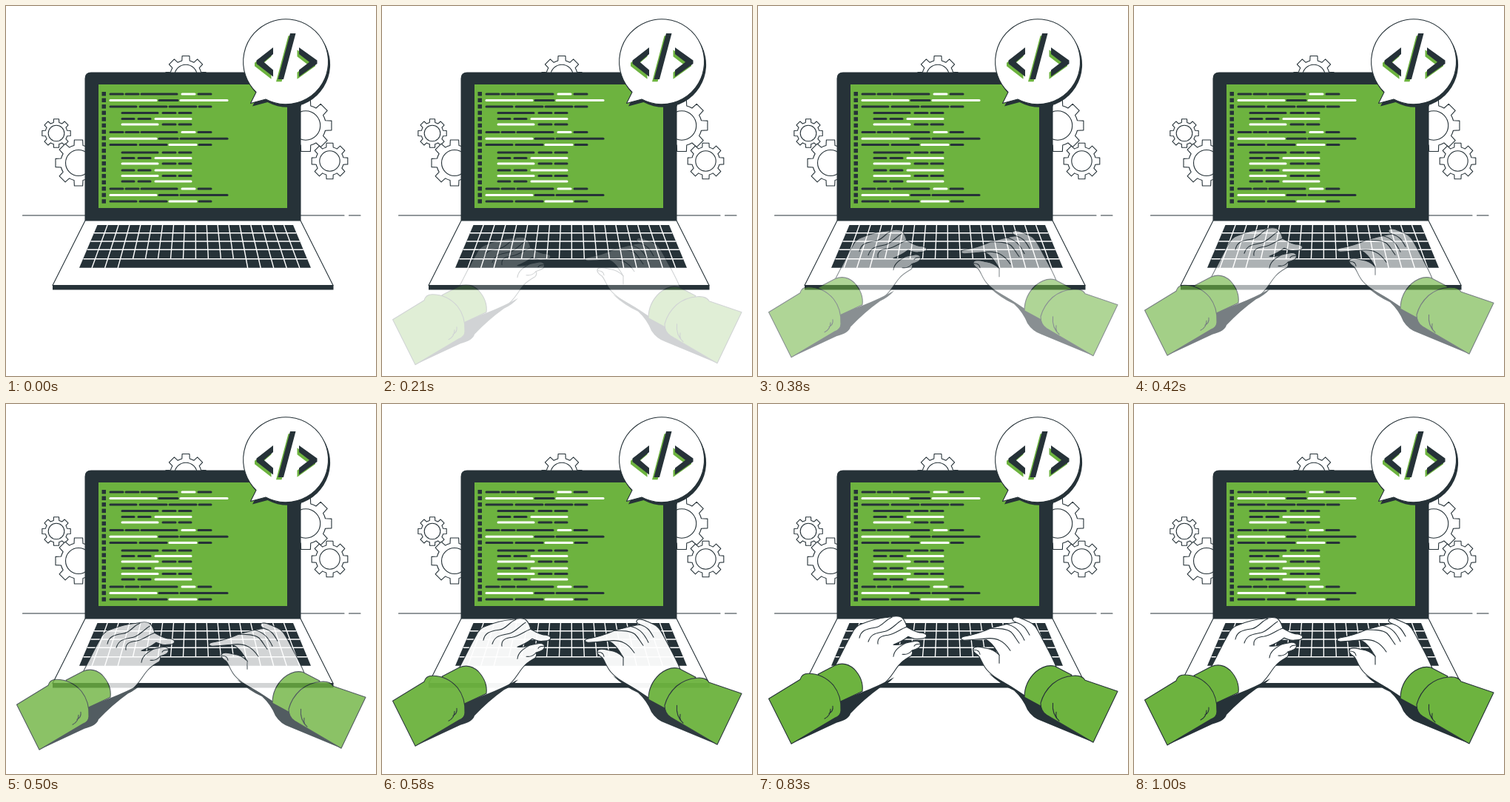
Write an HTML page that moves like this. It is 500 px wide and 500 px high and loops after 1.04 s.

```html
<!DOCTYPE html>
<html lang="en">
<head>
<meta charset="utf-8">
<title>Typing on a laptop</title>
<style>
html, body { margin: 0; width: 100%; height: 100%; overflow: hidden; background: #fff; }
svg { display: block; width: 100vw; height: 100vh; }
.dark { fill: #263238; }
.green { fill: #6db33f; }
.white { fill: #fff; }
.line { stroke: #263238; stroke-width: 1.1; stroke-linejoin: round; stroke-linecap: round; }
.none { fill: none; }
#code path { stroke-width: 3; stroke-linecap: round; }
#keys { fill: none; stroke: #fff; stroke-width: 1.4; }
</style>
</head>
<body>
<svg viewBox="0 0 500 500">
  <defs>
    <path id="bubble" d="M338 116.500L330.500 131.500L351 126A57.500 57.500 0 1 0 338 116.500Z"/>
    <path id="symbol" d="M361 56L338.500 73.500V78L361 95.500V86.500L348.500 75.800L361 65ZM396 56L420.500 73.500V78L396 95.500V86.500L410 75.800L396 65ZM384 37H391.500L375 99H367.500Z"/>
  </defs>

  <path class="line none" d="M22.500 283H107M398 283H457M463.500 283H479"/>
  <g id="gears" class="line white"></g>

  <path class="dark" d="M106.500 290V98Q106.500 89.500 115 89.500H390Q398.500 89.500 398.500 98V290Z"/>
  <path class="green" d="M125 106H380V273H125Z"/>
  <g id="code"></g>

  <path class="line white" d="M107 290H398L442 377.500H63Z"/>
  <path class="dark" d="M63 377H442.500V383.500H63Z"/>
  <path class="dark" d="M123.500 296H388L412 353.700H99Z"/>
  <path id="keys"/>

  <use href="#bubble" class="dark" x="2.500" y="4"/>
  <use href="#bubble" class="line white"/>
  <use href="#symbol" class="green" x="-2.500" y="3.200"/>
  <use href="#symbol" class="dark"/>

  <g id="hands">
    <!-- left -->
    <path class="line white" d="M104 356C113 339 120 324 127 312C130 305 134 301 140 299C152 294 164 291 176 290C184 288 191 287 195 291C199 295 200 299 201 303C208 307 214 311 222 311C227 312 229 314 227 317C225 319 221 319 217 319C211 320 207 318 203 316Q194 323 183 327Q191 328 199 325C205 323 209 323 213 322C218 322 221 325 219 329C217 333 212 333 208 335Q210 338 207 342C202 345 196 348 191 354C183 363 180 373 166 383L135 400Z"/>
    <path class="line none" d="M137 318C139 308 145 306 158 304C168 303 172 293 181 290M149 323C153 311 160 312 172 309C180 307 186 299 194 294M162 326C161 318 166 315 176 314C186 312 192 306 201 303M183 343C184 334 191 330 199 325M211 329Q212 326 219 326M208 335Q203 341 195 340"/>
    <path class="dark" d="M45 461L105 423L110 403L141 391Q164 382 184 371Q176 380 165 385Q144 400 125 420Q123 428 106 432.500Z"/>
    <path class="line green" d="M81 367L104 355Q118 349 130 360Q143 374 141 390L111 404Z"/>
    <path class="line green" d="M14.500 400L57 374Q59 366 68 366Q88 366 102 382Q113 396 112 416Q112 423 104 426L45 461Z"/>
    <path class="line none" d="M90 427Q98 423 98 414M96 420Q102 417 101 410"/>
    <!-- right -->
    <path class="line white" d="M403 357C396 340 388 327 382 315C377 306 374 299 366 296C358 293 351 288 346 290C342 292 344 295 349 297C337 298 326 302 314 305C303 310 290 314 278 316C273 317 274 321 279 321C290 321 298 319 305 319C313 321 319 329 326 341Q318 333 309 332C303 331 297 328 292 331C289 334 292 338 297 341C301 345 302 351 307 358C313 367 327 376 342 384L368 402Z"/>
    <path class="line none" d="M305 319C312 318 320 318 326 321C333 324 337 329 341 335M314 305C325 305 336 305 342 310C347 315 349 320 353 325M335 299C345 301 353 306 360 321M349 297C359 300 362 305 367 314M326 341V352M292 334Q299 334 300 340"/>
    <path class="dark" d="M312 366Q338 380 360 395L384 411L395 425L453 459L383 430Q371 426 364 415Q358 400 346 389Q328 381 312 366Z"/>
    <path class="line green" d="M360 398Q360 378 375 364Q388 353 401 356L424 368L384 411Z"/>
    <path class="line green" d="M486 390L442 375Q438 368 426 369Q410 370 398 380Q386 391 382 406Q382 417 390 422L453 459Z"/>
    <path class="line none" d="M398.500 406Q397 421 407 430M403 418Q402 423 404 427"/>
  </g>
</svg>
<script>
const el = id => document.getElementById(id);

function gear(x, y, r) {
  const at = (a, radius) => (x + radius * Math.sin(a)).toFixed(2) + ' ' + (y - radius * Math.cos(a)).toFixed(2);
  const root = r * .77;
  let d = '';
  for (let i = 0; i < 8; i++) {
    const a = i * Math.PI / 4;
    d += `${i ? `A${root} ${root} 0 0 1 ` : 'M'}${at(a - .25, root)}L${at(a - .18, r)}L${at(a + .18, r)}L${at(a + .25, root)}`;
  }
  d += `A${root} ${root} 0 0 1 ${at(-.25, root)}Z`;
  return `<path d="${d}"/><circle cx="${x}" cy="${y}" r="${r * .555}"/>`;
}

el('gears').innerHTML = [
  [243, 94.5, 27.5], [68, 172, 19.5], [98, 212, 31.5], [405, 161.5, 35.5], [437.5, 209.5, 24.7]
].map(g => gear(...g)).join('');

// Dash positions for each kind of code row; each row adds its colours (d dark, w white).
const layouts = {
  a: [141, 158, 162, 179, 183, 231, 238, 255, 260, 277],
  b: [141, 203, 207, 232, 236, 299],
  c: [141, 176, 181, 217, 221, 257, 261, 277],
  e: [157, 205, 212, 229, 234, 250],
  f: [157, 173, 179, 195, 202, 250]
};
const rows = `119 a dddwd,127.5 b wdw,136 c dddd,144.5 e ddd,152.5 f ddw,160 e wdd,
  170.5 a dddwd,179.3 b wdd,187.5 c ddwd,198 e ddd,205.5 f ddw,213 e wdd,
  222 f ddw,229.5 e wdd,237 f ddw,247 a dddwd,255.5 b wdd,264 c ddwd`;

el('code').innerHTML = rows.split(',').map((row, n) => {
  const [y, kind, colours] = row.trim().split(' ');
  const xs = layouts[kind];
  const dashes = [...colours].map((c, i) =>
    `<path stroke="${c === 'd' ? '#263238' : '#fff'}" d="M${xs[2 * i]} ${y}H${xs[2 * i + 1]}"/>`);
  return `<rect class="dark" x="129.5" y="${116 + n * 8.54}" width="5.5" height="5.5"/>` + dashes.join('');
}).join('');

let keys = [306.8, 318, 329.3, 341.7].map(y => {
  const spread = (y - 296) * .414;
  return `M${123.5 - spread} ${y}H${388 + spread}`;
}).join('');
for (let i = 1; i < 18; i++) {
  const top = 122.2 + i * 14.9, bottom = 98.5 + i * 17.55;
  const part = i > 3 && i < 13 ? .784 : 1; // the space bar has no gaps
  keys += `M${top} 296L${top + (bottom - top) * part} ${296 + 58 * part}`;
}
el('keys').setAttribute('d', keys);

const hands = el('hands');
function draw(now) {
  const step = Math.floor((now % 1040 + 4) * .024); // 24 poses a second
  const shown = Math.min(1, Math.max(0, (step - 2.5) / 12));
  const lift = step > 15 ? 1.8 * Math.sin(Math.PI * Math.min(1, (step - 15) / 9)) : 0;
  hands.setAttribute('opacity', shown);
  hands.setAttribute('transform', `translate(0 ${30 * (1 - shown) - lift})`);
}

const start = performance.now();
function tick() {
  draw(performance.now() - start);
  requestAnimationFrame(tick);
}
tick();
</script>
</body>
</html>
```
